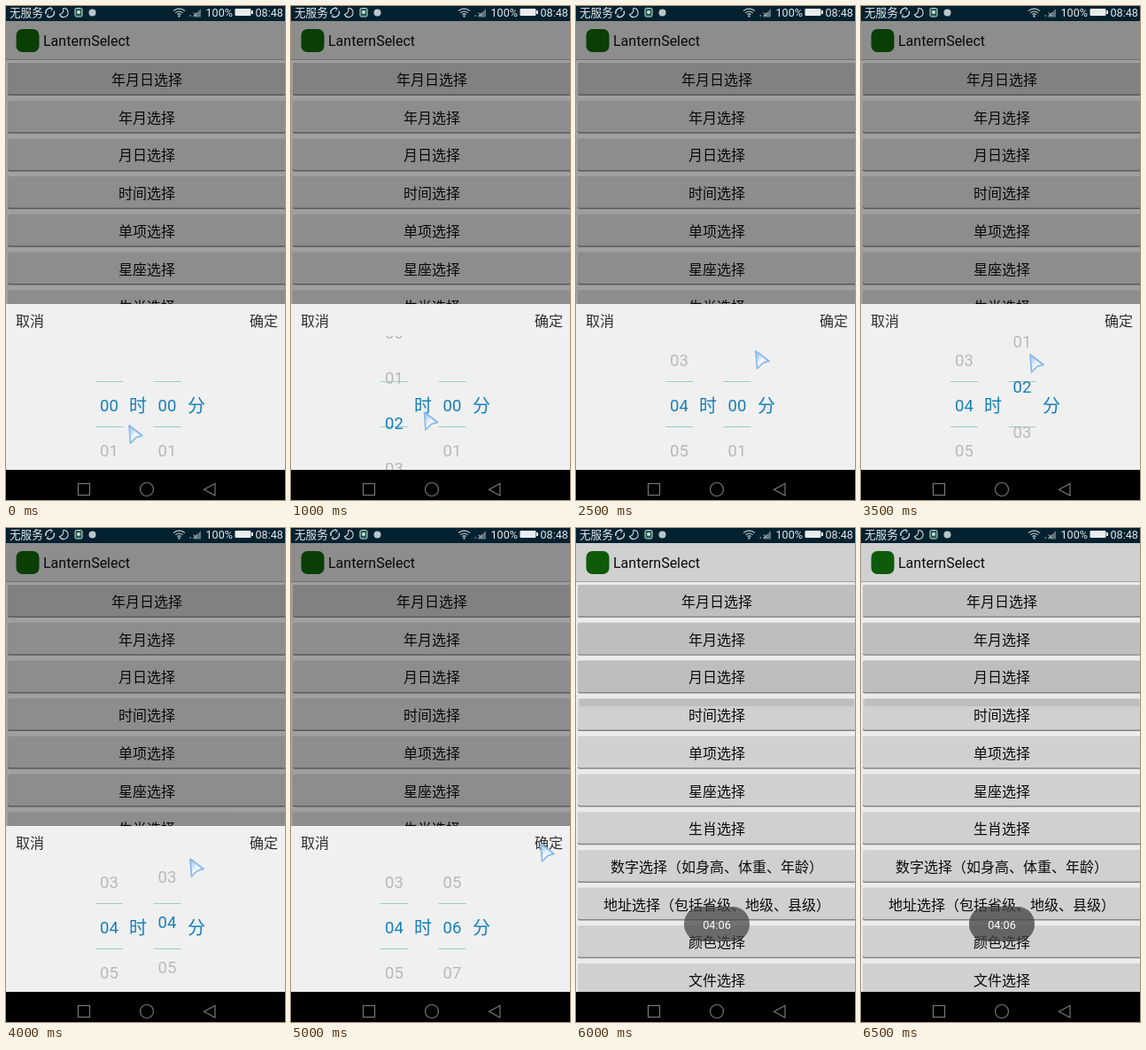
These frames come from a looping animation (315x557 px, 8 s). An HTML page:

```html
<!DOCTYPE html>
<html lang="zh-CN">
<head>
<meta charset="utf-8">
<title>Time picker</title>
<style>
  html, body { margin: 0; width: 100%; height: 100%; overflow: hidden; background: #000; }
  svg { display: block; width: 315px; height: 557px; }
  text { font-family: Roboto, "Noto Sans CJK SC", "Noto Sans CJK", sans-serif; white-space: pre; }
  .mid { text-anchor: middle; }
  .status text { font-size: 12.6px; fill: #e4eaed; }
  .row { font-size: 16px; fill: #0c0c0c; }
  .act { font-size: 16px; fill: #303030; }
  .unit { font-size: 20px; fill: #147fbb; }
  .wheel text { font-size: 18.5px; fill: #b9b9b9; }
  .wheel text.on { fill: #147fbb; }
</style>
</head>
<body>
<svg id="stage" viewBox="0 0 315 557"></svg>
<script>
(() => {
  const STEP = 500, LOOP = 8000, CLOSE = 11;
  const PITCH = 42.7, ITEM = 51, MID = 450;
  const rows = ['年月日选择', '年月选择', '月日选择', '时间选择', '单项选择', '星座选择', '生肖选择',
    '数字选择（如身高、体重、年龄）', '地址选择（包括省级、地级、县级）', '颜色选择', '文件选择'];

  // One entry per step; the last value holds.
  const hourPos = [0, 0, 1.6, 3.4, 3.76, 4];
  const minutePos = [0, 0, 0, 0, 0, 0, 1.2, 2.4, 4.1, 5.6, 6];
  const pointer = [[138, 472], [138, 396], [149.5, 457], [149, 396], [190, 402], [202, 388],
    [188, 432], [190, 392], [207, 372], [278, 355], [281, 355], [281, 355]];
  const toastAlpha = [.5, .94, 1];

  const rect = (x, y, w, h, fill, more = '') =>
    `<rect x="${x}" y="${y}" width="${w}" height="${h}" fill="${fill}" ${more}/>`;
  const text = (x, y, s, cls = '') => `<text x="${x}" y="${y}" class="${cls}">${s}</text>`;
  const line = (d, color, w = 1) => `<path d="${d}" fill="none" stroke="${color}" stroke-width="${w}"/>`;
  const rowTop = i => 64 + PITCH * i;

  const face = (i, fill) => rect(2, rowTop(i), 314, 35.5, fill, 'rx="2"');
  const button = (_, i) => rect(2, rowTop(i) + 1, 314, 36, '#858585', 'rx="2"')
    + face(i, i ? '#d0d0d0' : '#bebebe');
  const label = (s, i) => text(159, rowTop(i) + 25, s, 'row mid');

  const wheel = (id, x, count) =>
    rect(x - 15.5, 423, 31, 1, '#98cdc9') + rect(x - 15.5, 474, 31, 1, '#98cdc9')
    + `<g class="wheel" clip-path="url(#slot)"><g id="${id}">`
    + Array.from({ length: count }, (_, i) =>
        text(x, MID + 6.6 + ITEM * i, String(i).padStart(2, '0'), 'mid')).join('')
    + '</g></g>';

  const statusBar = `<g class="status">${rect(0, 0, 315, 17, '#04212f')}
    ${text(4, 12, '无服务')}
    ${line('M45 9A5 5 0 0 1 52 3M54 5.5A5 5 0 0 1 46.5 11.5', '#d5dde1', 1.3)}
    ${line('M50 1.5l2.5 1.6-2 2.4M48.5 13.2l-2.5-1.7 2-2.3', '#d5dde1')}
    ${line('M64.5 2.5A5 5 0 1 1 60.5 9.5A5.2 5.2 0 0 0 64.5 2.5', '#d5dde1', 1.1)}
    ${rect(78, 2.5, 8, 9.5, '#1f5b50', 'rx="1.5" stroke="#cfe0da"')}
    <circle cx="82" cy="7" r="2" fill="#cfe0da"/>
    <circle cx="97.5" cy="7.5" r="4" fill="#b9c6cc"/>
    ${line('M189 5.5Q195.5 .5 202 5.5M191.3 7.7Q195.5 4.5 199.7 7.7M193.5 9.7Q195.5 8 197.5 9.7', '#a9b7be', 1.4)}
    <circle cx="195.5" cy="11.5" r="1.2" fill="#a9b7be"/>
    ${rect(207.5, 10, 1.5, 2, '#71838c')}
    <path d="M211 12.5L220 3v9.5z" fill="#60747e"/>
    ${line('M211.5 7.5l4 4m0-4l-4 4', '#d0d8dc')}
    ${text(225.5, 12, '100%')}
    ${rect(258.5, 3, 18, 8, '#e8edef', 'rx="1"')}${rect(277, 5, 2, 4, '#e8edef')}
    ${text(281.5, 12, '08:48')}</g>`;

  const navBar = rect(0, 523, 315, 34, '#000')
    + rect(81.5, 538.5, 13, 13, 'none', 'stroke="#777" stroke-width="1.2"')
    + '<circle cx="159" cy="545" r="7.5" fill="none" stroke="#777" stroke-width="1.2"/>'
    + line('M236 538.5V552L223.5 545.2Z', '#777', 1.2);

  const el = id => document.getElementById(id);
  el('stage').innerHTML = `<defs>
      <clipPath id="slot"><rect x="95" y="372" width="110" height="151"/></clipPath>
      <linearGradient id="ice" x1="0" y1="0" x2="1" y2="1">
        <stop offset="0" stop-color="#8fc0f0"/><stop offset=".5" stop-color="#f2f8ff"/>
        <stop offset="1" stop-color="#a9d0f6"/>
      </linearGradient>
    </defs>
    ${rect(0, 17, 315, 506, '#ebebeb')}
    ${rect(0, 17, 315, 43, '#d0d0d0')}${rect(0, 60, 315, 1, '#a2a2a2')}
    ${rect(11.5, 26, 26, 26, '#0d5b08', 'rx="7"')}
    ${text(42, 45, 'LanternSelect', 'row')}
    ${rows.map(button).join('')}
    <g id="stale">${face(1, '#bebebe')}${face(2, '#bebebe')}${rect(4, 193, 310, 8, '#bebebe')}</g>
    ${rows.map(label).join('')}
    <g id="sheet">
      ${rect(0, 17, 315, 506, '#000', 'opacity=".32"')}
      ${rect(0, 336, 315, 187, '#f0f0f0')}
      ${text(11, 361, '取消', 'act')}${text(275, 361, '确定', 'act')}
      ${wheel('hours', 116.5, 8)}${text(149, 458, '时', 'unit mid')}
      ${wheel('minutes', 182, 10)}${text(215, 458, '分', 'unit mid')}
    </g>
    <g id="toast">
      ${rect(122, 427, 74, 39, '#464646', 'rx="19" fill-opacity=".78"')}
      <text x="159" y="452" class="mid" font-size="12.7" fill="#fff">04:06</text>
    </g>
    ${navBar}${statusBar}
    <path id="pointer" d="M1 1L16 12.5L9 14.5L2.5 21Z" fill="url(#ice)"
      stroke="#86b7e8" stroke-width="1.6" stroke-linejoin="round"/>`;

  const at = (list, i) => list[Math.min(i, list.length - 1)];
  const show = (id, on) => el(id).setAttribute('visibility', on ? 'visible' : 'hidden');

  function turn(id, pos) {
    const g = el(id);
    g.setAttribute('transform', `translate(0 ${-pos * ITEM})`);
    [...g.children].forEach((t, i) => t.classList.toggle('on', i === Math.round(pos)));
  }

  function draw(n) {
    const open = n < CLOSE;
    show('sheet', open);
    show('stale', !open);
    show('toast', !open);
    show('pointer', n < pointer.length);
    turn('hours', at(hourPos, n));
    turn('minutes', at(minutePos, n));
    el('pointer').setAttribute('transform', `translate(${at(pointer, n)})`);
    if (!open) el('toast').setAttribute('opacity', at(toastAlpha, n - CLOSE));
  }

  const start = performance.now();
  let last = -1;
  function tick() {
    const n = Math.floor((performance.now() - start) % LOOP / STEP);
    if (n !== last) draw(last = n);
    requestAnimationFrame(tick);
  }
  tick();
})();
</script>
</body>
</html>
```
